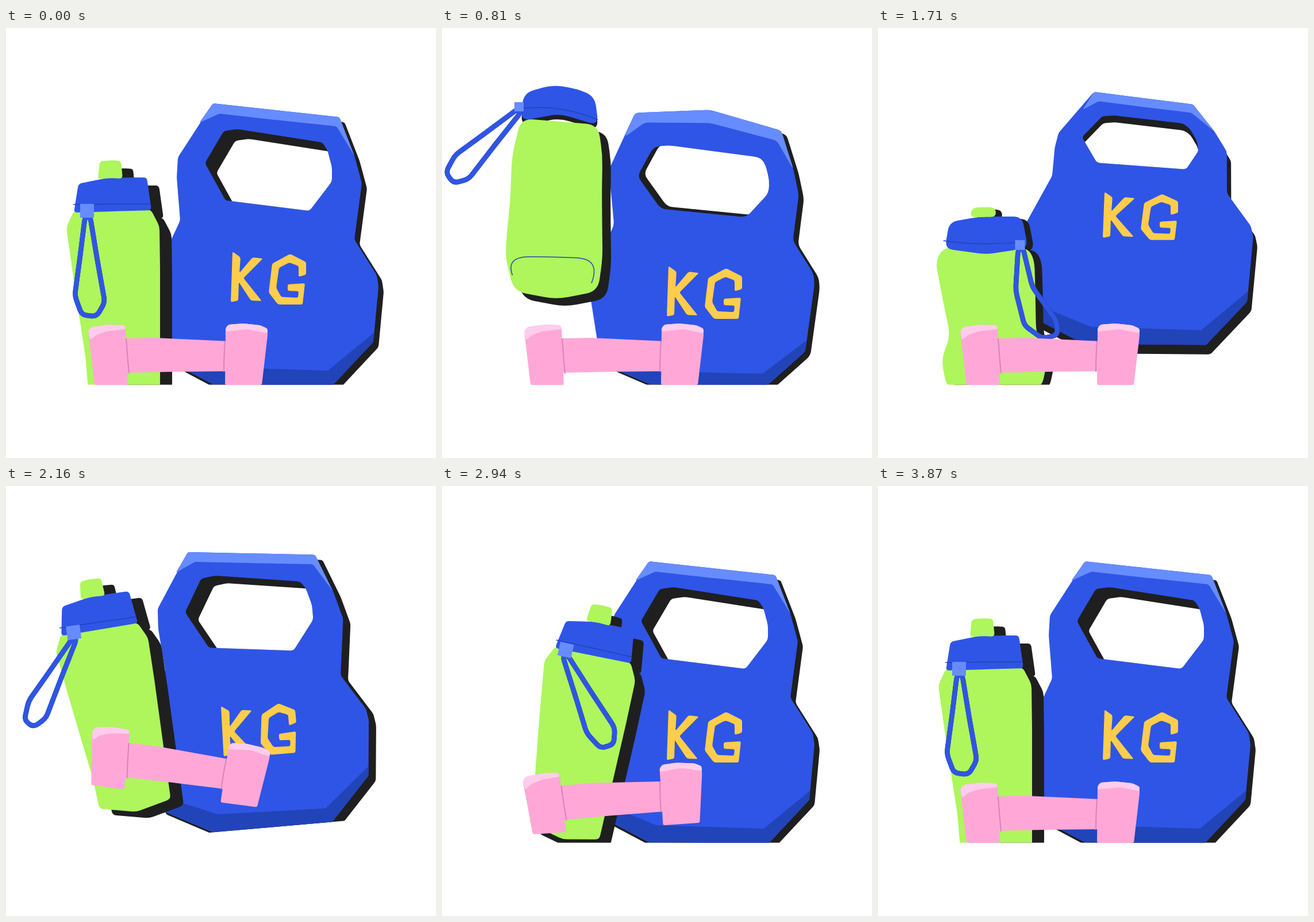
An HTML page with a canvas for the animation above (3900 ms loop, 748x748 px).

```html
<!DOCTYPE html>
<html lang="en">
<head>
<meta charset="utf-8">
<title>Gym gear</title>
<style>
  html, body { margin: 0; height: 100%; overflow: hidden; background: #fff; }
  canvas { display: block; }
</style>
</head>
<body>
<canvas id="stage" width="748" height="748"></canvas>
<script>
const ctx = document.getElementById('stage').getContext('2d');
const LOOP = 3900, FLOOR = 620.5;
const BLUE = '#2f55e6', LIGHT = '#668cff', DARK = '#2144b8', BLACK = '#1f1f1f', GREEN = '#aef65c',
      YELLOW = '#ffcd4b', PINK = '#ffa8d8', PALE = '#ffcdec', ROSE = '#e07fba';

const mix = (a, b, p) => a + (b - a) * p;
const points = text => text.split(' ').map(pair => pair.split(',').map(Number));

// Each outline is drawn once, at rest; poses bend it.
// Warp rows: height, new height, widening, shift, upward or downward bow, slant
const kettlebell = {
  center: 460, span: 110, pivot: [360, 620],
  body: points('360,131 470,143 580,155 606,222 619,270 606,368 645,430 648,450 639,546 568,622 360,620 270,572 254,440 303,335 297,260 299,225'),
  shine: points('336,165 360,131 470,143 580,155 606,222 575,171 470,160 371,149'),
  base: points('267,546 372,590 560,596 640,530 639,546 568,622 360,620 270,572'),
  hole: points('346,235 379,179 403,176 550,199 559,212 567,242 567,267 528,318 382,300'),
  letters: [
    points('394,389 408,399 406,426 429,399 447,401 413,435 445,475 426,474 405,442 404,474 391,477'),
    points('494,393 522,407 522,429 509,433 509,414 493,408 475,417 470,452 479,468 508,469 509,458 490,457 490,446 520,444 516,481 473,481 457,460 463,410')],
  poses: {
    rest: { soft: 1, cast: [9, 9], depth: [20, 17], text: [0, 1] },
    tilt: { soft: 1, cast: [12, 10], depth: [21, 15], text: [14, 1] },
    squash: { soft: 2, cast: [9, 7], depth: [11, -4], text: [25, 1], warp: [
      [131, 152, 1.17, -7, -26], [171, 196, 1.1, -4, -16], [176, 204, 1.09, -4], [270, 290, 1.01],
      [368, 370, 1.03], [450, 446, 1], [546, 563, .96], [620, 620, .98]] },
    jump: { soft: 1, cast: [7, 18], depth: [-2, 11], text: [-125, .89], warp: [
      [131, 107, .73, -8], [176, 147, .75, -7], [222, 172, .86, -4], [270, 204, .92, -2], [318, 231, 1.1, 3],
      [335, 241, 1], [450, 346, 1.03], [540, 456, 1.02], [620, 535, 1.03]] }
  },
  // Keys: time, pose, shift x, shift y, degrees, ease power into this key
  track: [
    [0, 'rest'], [660, 'rest'], [810, 'squash'], [860, 'squash'], [1280, 'jump'], [1320, 'jump'],
    [1960, 'rest', 0, 0, 0, 3.6], [2160, 'tilt', -1, -18, -5], [2290, 'tilt', 0, -25, -5.4], [2540, 'rest'],
    [2720, 'rest', 0, -13, 3.5], [2930, 'rest', 0, 0, 0, 2.5], [LOOP, 'rest']]
};

// Strap: anchor x, y, angle from straight down, length, spread, bend, shadow distance, tab size
const upright = { soft: 1, cast: [21, 14], lidCast: [21, 14], heel: [0] };
const bottle = {
  center: 190, span: 72, pivot: [206, 620],
  body: points('118,318 252,316 267,345 268,420 268,520 268,570 268,628 206,642 143,628 138,570 131,525 118,440 105,347'),
  cap: points('118,321 126,271 175,261 215,260 245,260 253,317 185,319'),
  spout: points('160,263 163,232 182,230 200,231 203,262 182,261'),
  seam: points('117,307 185,306 251,306'),
  heel: points('144,600 138,568 200,567 266,572 257,614'),
  poses: {
    rest: { ...upright, strap: [141, 328, 1, 176, 27, 0, 0, 24] },
    left: { ...upright, strap: [140, 328, -36, 172, 21, 0, 0, 24] },
    right: { ...upright, strap: [137, 330, 38, 178, 25, 0, 0, 24] },
    flip: { soft: 3, cast: [15, 13], lidCast: [0, 8], heel: [1.5], strap: [134, 143, -46, 172, 24, 0, 0, 16], warp: [
      [231, 120, 1.05, 18, -20, .13], [262, 120, 1.05, 18, -20, .13], [306, 153, 1, 20, -20, .2],
      [321, 170, 1, 19, -18, .11], [347, 224, .97, 14], [440, 300, 1.06, 5], [570, 400, 1.3, -12], [622, 452, 1.18, -10]] },
    fall: { soft: 1.4, cast: [20, 6], lidCast: [20, 9], heel: [0], strap: [250, 290, 51, 165, 25, 0, 14, 0], warp: [
      [231, 183, .87, -17], [262, 251, 1, -3], [306, 295, 1, -2, 3, -.06], [321, 309, .98, -2, 5, -.09],
      [347, 364, 1], [622, 601, .99, 2], [642, 603, 1]] },
    land: { soft: 2.5, cast: [13, 3], lidCast: [11, 4], heel: [0], strap: [247, 384, 19, 165, 27, -18, 0, 17], warp: [
      [231, 312, 1.1, 3], [262, 329, 1.06, 2], [306, 369, 1.06, 1, 11], [321, 384, 1.08, 4, 12],
      [347, 404, 1.06], [525, 535, 1.09], [570, 577, 1.42, -6], [622, 621, 1.33, -8]] }
  },
  track: [
    [0, 'rest'], [180, 'rest'], [810, 'flip'], [870, 'flip', 0, -6], [1320, 'fall'], [1710, 'land', 0, 0, 0, 1.5],
    [1770, 'land'], [2160, 'left', 18, -75, -7.8], [2300, 'left', 18, -80, -8.5], [2580, 'rest', 5, -15],
    [2940, 'right', 9, -27, 13], [3260, 'right', 12, -52, 15], [3700, 'rest'], [LOOP, 'rest']]
};

const dumbbell = {
  pivot: [300, 568],
  bar: points('200,540 260,539 390,545 390,597 290,598 200,600'),
  bells: [points('143,527 149,520 178,516 206,517 208,523 212,621 154,621'),
          points('382,522 387,516 412,514 442,517 455,523 455,535 445,621 381,621')],
  tops: [points('143,527 149,520 178,516 206,517 208,524 178,527 158,533 146,543'),
         points('382,522 387,516 412,514 442,517 455,523 455,531 420,524 382,528')],
  grooves: [points('209,540 211,570 214,601'), points('381,545 379,570 379,598')],
  poses: { rest: { soft: 1 } },
  track: [
    [0, 'rest'], [1830, 'rest'], [2160, 'rest', 0, -81, 7.6], [2290, 'rest', 0, -88, 8], [2620, 'rest'],
    [2940, 'rest', 0, -25, -4], [3020, 'rest', 0, -28, -4.4], [3350, 'rest'], [LOOP, 'rest']]
};

let item, from, to, progress;

function enter(t) {
  const i = item.track.findIndex(key => key[0] > t);
  const a = item.track[i - 1], b = item.track[i], u = (t - a[0]) / (b[0] - a[0]);
  progress = b[5] ? u ** b[5] : u * u * (3 - 2 * u);
  from = item.poses[a[1]];
  to = item.poses[b[1]];
  const [x, y, angle] = [2, 3, 4].map(n => mix(a[n] || 0, b[n] || 0, progress));
  const [px, py] = item.pivot;
  ctx.translate(px + x, py + y);
  ctx.rotate(angle * Math.PI / 180);
  ctx.translate(-px, -py);
}

const blend = name => from[name].map((n, i) => mix(n, to[name][i], progress));

function bendPoint(rows, [x, y]) {
  if (!rows) return [x, y];
  const found = rows.findIndex(row => row[0] > y);
  const i = found < 0 ? rows.length - 1 : Math.max(found, 1);
  const a = rows[i - 1], b = rows[i], p = (y - a[0]) / (b[0] - a[0]);
  const [newY, widen, shift, bow, slant] = [1, 2, 3, 4, 5].map(n => mix(a[n] || 0, b[n] || 0, p));
  const dx = x - item.center;
  return [item.center + dx * widen + shift, newY + slant * dx + bow * Math.max(0, 1 - (dx / item.span) ** 2)];
}

function warp(point) {
  const a = bendPoint(from.warp, point), b = bendPoint(to.warp, point);
  return [mix(a[0], b[0], progress), mix(a[1], b[1], progress)];
}

function towards(p, q, radius) {
  const length = Math.hypot(q[0] - p[0], q[1] - p[1]) || 1, k = Math.min(radius / length, .5);
  return [mix(p[0], q[0], k), mix(p[1], q[1], k)];
}

function trace(shape, radius) {
  const n = shape.length;
  ctx.beginPath();
  shape.forEach((p, i) => {
    ctx.lineTo(...towards(p, shape[(i + n - 1) % n], radius));
    ctx.quadraticCurveTo(...p, ...towards(p, shape[(i + 1) % n], radius));
  });
  ctx.closePath();
}

function fill(color, shape, radius, [dx, dy] = [0, 0]) {
  const soft = mix(from.soft, to.soft, progress);
  trace(shape.map(warp).map(([x, y]) => [x + dx, y + dy]), radius * soft);
  ctx.fillStyle = color;
  ctx.fill();
}

function stroke(color, shape, width) {
  if (width < .2) return;
  const line = shape.map(warp), last = line.length - 1;
  ctx.beginPath();
  ctx.moveTo(...line[0]);
  for (let i = 1; i < last; i++) {
    const end = i === last - 1 ? line[last] : towards(line[i], line[i + 1], 1e4);
    ctx.quadraticCurveTo(...line[i], ...end);
  }
  ctx.lineWidth = width;
  ctx.strokeStyle = color;
  ctx.stroke();
}

function clipFloor() {
  ctx.beginPath();
  ctx.rect(-400, -400, 1600, 400 + FLOOR);
  ctx.clip();
}

function drawKettlebell(t) {
  const { body, shine, base, hole, letters } = item = kettlebell;
  enter(t);
  clipFloor();
  fill(BLACK, body, 4, blend('cast'));
  fill(BLUE, body, 4);
  fill(LIGHT, shine, 3);
  fill(DARK, base, 1);
  const [drop, height] = blend('text');
  for (const letter of letters) {
    trace(letter.map(([x, y]) => [x, 389 + (y - 389) * height + drop]), 3);
    ctx.fillStyle = YELLOW;
    ctx.fill();
  }
  fill(BLACK, hole, 5);
  ctx.clip();
  fill('#fff', hole, 5, blend('depth'));
}

function drawStrap() {
  const [x, y, angle, length, spread, bend, cast, tab] = blend('strap');
  const sin = Math.sin(angle * Math.PI / 180), cos = Math.cos(angle * Math.PI / 180);
  const loop = [[0, -.13], [.4, -.5], [.78, -.88], [.97, -.45], [.99, .5], [.85, 1.05], [.42, .6], [0, .2]];
  const place = shift => loop.map(([u, v]) => {
    const along = u * length, side = v * spread + bend * 4 * u * (1 - u);
    return [x + along * sin + side * cos + shift * .6, y + along * cos - side * sin + shift];
  });
  ctx.lineWidth = 8.5;
  for (const [color, shift] of [[BLACK, cast], [BLUE, 0]]) {
    trace(place(shift), 9);
    ctx.strokeStyle = color;
    ctx.stroke();
  }
  ctx.fillStyle = LIGHT;
  ctx.fillRect(x - tab / 2, y + 2 - tab, tab, tab);
}

function drawBottle(t) {
  const { body, cap, spout, seam, heel } = item = bottle;
  clipFloor();
  enter(t);
  fill(BLACK, spout, 5, blend('lidCast'));
  fill(BLACK, cap, 6, blend('lidCast'));
  fill(BLACK, body, 7, blend('cast'));
  fill(GREEN, body, 7);
  stroke(DARK, heel, blend('heel')[0]);
  fill(BLUE, cap, 6);
  stroke(DARK, seam, 1.5);
  fill(GREEN, spout, 6);
  drawStrap();
}

function drawDumbbell(t) {
  const { bar, bells, tops, grooves } = item = dumbbell;
  enter(t);
  fill(PINK, bar, 0);
  bells.forEach(bell => fill(PINK, bell, 3));
  tops.forEach(top => fill(PALE, top, 3));
  grooves.forEach(groove => stroke(ROSE, groove, 2));
}

const begin = performance.now();
function frame() {
  const t = (performance.now() - begin) % LOOP;
  ctx.fillStyle = '#fff';
  ctx.fillRect(0, 0, 748, 748);
  for (const draw of [drawKettlebell, drawBottle, drawDumbbell]) {
    ctx.save();
    draw(t);
    ctx.restore();
  }
  requestAnimationFrame(frame);
}
frame();
</script>
</body>
</html>
```
